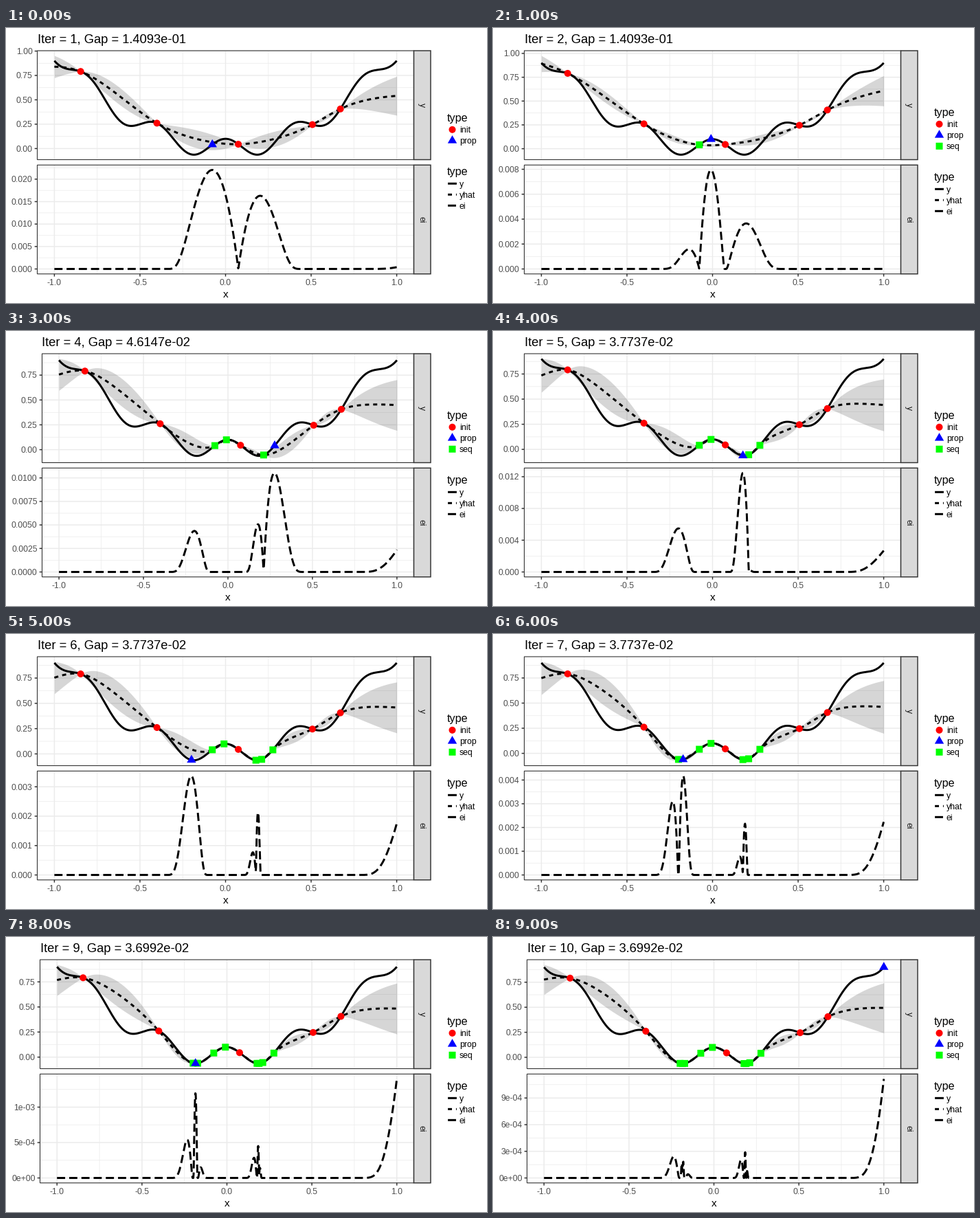
Recreate the animation shown at these times as a matplotlib script. Size 700x400 px, loop 10000 ms.

```python
import math

import numpy as np
import matplotlib.pyplot as plt
from matplotlib.animation import FuncAnimation
from matplotlib.patches import Circle, Polygon, Rectangle

plt.rcParams["font.family"] = ["Liberation Sans", "DejaVu Sans"]
plt.rcParams["path.snap"] = False

W, H, DPI = 700, 400, 100
PT = 72 / DPI
RIGHT, STRIP_END = 593.5, 618
PANELS = [(33, 191.5), (199.3, 357.7)]
INK, TICK, GRID = "#333333", "#4D4D4D", "#EBEBEB"

INIT = np.array([-0.8465, -0.401, 0.0745, 0.5075, 0.671])
PROPOSED = np.array([-0.0773, -0.009, 0.2112, 0.2765, 0.1773,
                     -0.199, -0.172, 0.1893, -0.185, 1.0])
GAPS = [0.14093, 0.14093, 0.046147, 0.046147, 0.037737,
        0.037737, 0.037737, 0.037242, 0.036992, 0.036992]
GRID_X = np.linspace(-1, 1, 1001)


def objective(x):
    return x ** 2 + 0.1 * np.cos(5 * np.pi * x)


# ---- Gaussian process with a Matern 3/2 kernel and constant trend ----

def matern(a, b, theta):
    h = math.sqrt(3) * np.abs(a[:, None] - b[None, :]) / theta
    return (1 + h) * np.exp(-h)


def fit(x, y, theta):
    chol = np.linalg.cholesky(matern(x, x, theta) + 1e-8 * np.eye(len(x)))
    ones = np.linalg.solve(chol, np.ones(len(x)))
    z = np.linalg.solve(chol, y)
    mu = ones @ z / (ones @ ones)
    resid = z - mu * ones
    var = resid @ resid / len(x)
    loss = len(x) * math.log(var) + 2 * np.log(np.diag(chol)).sum()
    return loss, theta, chol, ones, mu, resid, var


def predict(x, y, at):
    thetas = np.geomspace(0.03, 2 * np.ptp(x), 400)
    _, theta, chol, ones, mu, resid, var = min(
        (fit(x, y, t) for t in thetas), key=lambda m: m[0])
    c = np.linalg.solve(chol, matern(x, at, theta))
    mean = mu + c.T @ resid
    trend = (1 - ones @ c) ** 2 / (ones @ ones)
    s2 = var * (1 - (c ** 2).sum(axis=0) + trend)
    return mean, np.sqrt(np.maximum(s2, 0))


def expected_improvement(mean, se, best):
    s = np.maximum(se, 1e-9)
    z = (best - mean) / s
    cdf = 0.5 * (1 + np.vectorize(math.erf)(z / math.sqrt(2)))
    pdf = np.exp(-z ** 2 / 2) / math.sqrt(2 * math.pi)
    ei = (best - mean) * cdf + s * pdf
    return np.where(se < 1e-6, 0, np.maximum(ei, 0))


def run_step(i):
    x = np.concatenate([INIT, PROPOSED[:i]])
    y = objective(x)
    mean, se = predict(x, y, GRID_X)
    return mean, se, expected_improvement(mean, se, y.min())


STEPS = [run_step(i) for i in range(len(PROPOSED))]


# ---- axis breaks and labels ----

def break_step(lo, hi):
    """Step of the best labelling (extended Wilkinson) around zero."""
    span = hi - lo
    z = math.floor(math.log10(span))
    best = (-math.inf, 1)
    for i, q in enumerate([1, 5, 2, 2.5, 4, 3]):
        for e in (z - 1, z):
            s = q * 10.0 ** e
            for a in range(math.floor(lo / s), 1):
                for b in range(1, math.ceil(hi / s) + 1):
                    first, last = a * s, b * s
                    cover = 1 - 0.5 * ((hi - last) ** 2 + (lo - first) ** 2) / (0.1 * span) ** 2
                    ratio = (max(last, hi) - min(first, lo)) / (4 * s)
                    dense = 2 - max(ratio, 1 / ratio)
                    best = max(best, (0.25 * (1 - i / 5) + 0.2 * cover + 0.5 * dense, s))
    return best[1]


def multiples(lo, hi, step, offset=0.0):
    slack = 0.005 * (hi - lo)
    k = np.arange(math.floor(lo / step) - 1, math.ceil(hi / step) + 2)
    v = (k + offset) * step
    return v[(v >= lo - slack) & (v <= hi + slack)]


def labels(values):
    def same(spec):
        return all(abs(float(format(v, spec)) - v) < 1e-9 for v in values)

    def shortest(kind):
        spec = next(s for s in (f".{d}{kind}" for d in range(12)) if same(s))
        return [format(v, spec) for v in values]

    fixed, sci = shortest("f"), shortest("e")
    return fixed if max(map(len, fixed)) <= max(map(len, sci)) else sci


class Axis:
    def __init__(self, lo, hi):
        pad = 0.05 * (hi - lo)
        self.lo, self.hi = lo - pad, hi + pad
        step = break_step(self.lo, self.hi)
        self.major = multiples(self.lo, self.hi, step)
        self.minor = multiples(self.lo, self.hi, step, 0.5)
        self.labels = labels(self.major)

    def scale(self, v, start, end):
        return start + (np.asarray(v) - self.lo) / (self.hi - self.lo) * (end - start)


# ---- drawing in pixels ----

fig = plt.figure(figsize=(W / DPI, H / DPI), dpi=DPI, facecolor="white")
ax = fig.add_axes([0, 0, 1, 1])


def line(x, y, color="black", width=2.96, dash=None, z=3):
    extra = {"dashes": dash, "dash_capstyle": "butt"} if dash else {"solid_capstyle": "butt"}
    ax.plot(x, y, color=color, lw=width * PT, zorder=z, **extra)


def text(x, y, s, size=8.8, color="black", ha="left", va="baseline", **kw):
    ax.text(x, y, s, fontsize=size, color=color, ha=ha, va=va, zorder=8, **kw)


def box(x0, y0, x1, y1, fill, width, z):
    ax.add_patch(Rectangle((x0, y0), x1 - x0, y1 - y0, facecolor=fill,
                           edgecolor=INK, lw=width * PT, zorder=z))


def point(x, y, kind):
    if kind == "init":
        shape = Circle((x, y), 5, fc="#FF0000")
    elif kind == "seq":
        shape = Rectangle((x - 5, y - 5), 10, 10, fc="#00FF00")
    else:
        shape = Polygon([(x, y - 7.7), (x - 6.7, y + 3.85), (x + 6.7, y + 3.85)], fc="#0000FF")
    shape.set(ec="none", zorder=6)
    ax.add_patch(shape)


def draw_panel(left, xs, axis, top, bottom, name):
    def to_y(v):
        return axis.scale(v, bottom, top)

    for width, vx, vy, z in ((0.74, xs.minor, axis.minor, 0), (1.48, xs.major, axis.major, 1)):
        for x in xs.scale(vx, left, RIGHT):
            line([x, x], [top, bottom], GRID, width, z=z)
        for y in to_y(vy):
            line([left, RIGHT], [y, y], GRID, width, z=z)
    for y, s in zip(to_y(axis.major), axis.labels):
        line([left - 3.8, left], [y, y], INK, 1.48)
        text(left - 6.9, y + 4.3, s, color=TICK, ha="right")
    box(left, top, RIGHT, bottom, "none", 1.1, 7)
    box(RIGHT, top, STRIP_END, bottom, "#D9D9D9", 1.48, 7)
    text(604.7, (top + bottom) / 2, name, color="#1A1A1A", ha="center", va="center", rotation=270)
    return to_y


def draw_legends(kinds):
    shift = 8 * (len(kinds) - 2)
    y = 131 - shift
    text(641.5, y + 5, "type", 11.6)
    for k, kind in enumerate(kinds):
        cy = y + 16.8 + 16 * k
        point(649.5, cy, kind)
        text(659.8, cy + 4.3, kind)
    y = 209 + shift
    text(641.5, y + 5, "type", 11.6)
    for k, (name, dash) in enumerate((("y", None), ("yhat", (2, 2)), ("ei", (4, 2)))):
        cy = y + 17.3 + 16 * k
        line([643.1, 655.9], [cy, cy], dash=dash)
        text(659.8, cy + 4.3, name)


def draw(i):
    ax.clear()
    ax.set(xlim=(0, W), ylim=(H, 0))
    ax.axis("off")

    mean, se, ei = STEPS[i]
    truth = objective(GRID_X)
    low, high = mean - se, mean + se
    xs = Axis(-1, 1)
    y_axis = Axis(min(low.min(), truth.min()), max(high.max(), truth.max()))
    ei_axis = Axis(0, ei.max())
    widest = max(ei_axis.labels, key=len)
    left = 49.5 if "e" in widest else 38.5 + 7 * (len(widest) - 4)

    text(left, 22, f"Iter = {i + 1}, Gap = {GAPS[i]:.4e}", 13.2)
    to_y = draw_panel(left, xs, y_axis, *PANELS[0], "y")
    to_ei = draw_panel(left, xs, ei_axis, *PANELS[1], "ei")

    px = xs.scale(GRID_X, left, RIGHT)
    ax.fill_between(px, to_y(low), to_y(high), color=INK, alpha=0.2, lw=0, zorder=2)
    line(px, to_y(truth))
    line(px, to_y(mean), dash=(2, 2))
    line(px, to_ei(ei), dash=(4, 2))

    groups = (("init", INIT), ("seq", PROPOSED[:i]), ("prop", PROPOSED[i:i + 1]))
    for kind, pts in groups:
        for x, y in zip(xs.scale(pts, left, RIGHT), to_y(objective(pts))):
            point(x, y, kind)

    bottom = PANELS[1][1]
    for x, s in zip(xs.scale(xs.major, left, RIGHT), xs.labels):
        line([x, x], [bottom, bottom + 3.8], INK, 1.48)
        text(x, 374.5, s, color=TICK, ha="center")
    text((left + RIGHT) / 2, 391.7, "x", 11, ha="center")
    draw_legends(["init", "prop", "seq"] if i else ["init", "prop"])


anim = FuncAnimation(fig, draw, frames=len(PROPOSED), interval=1000,
                     init_func=lambda: None, repeat=True, repeat_delay=0)
plt.show()
```
